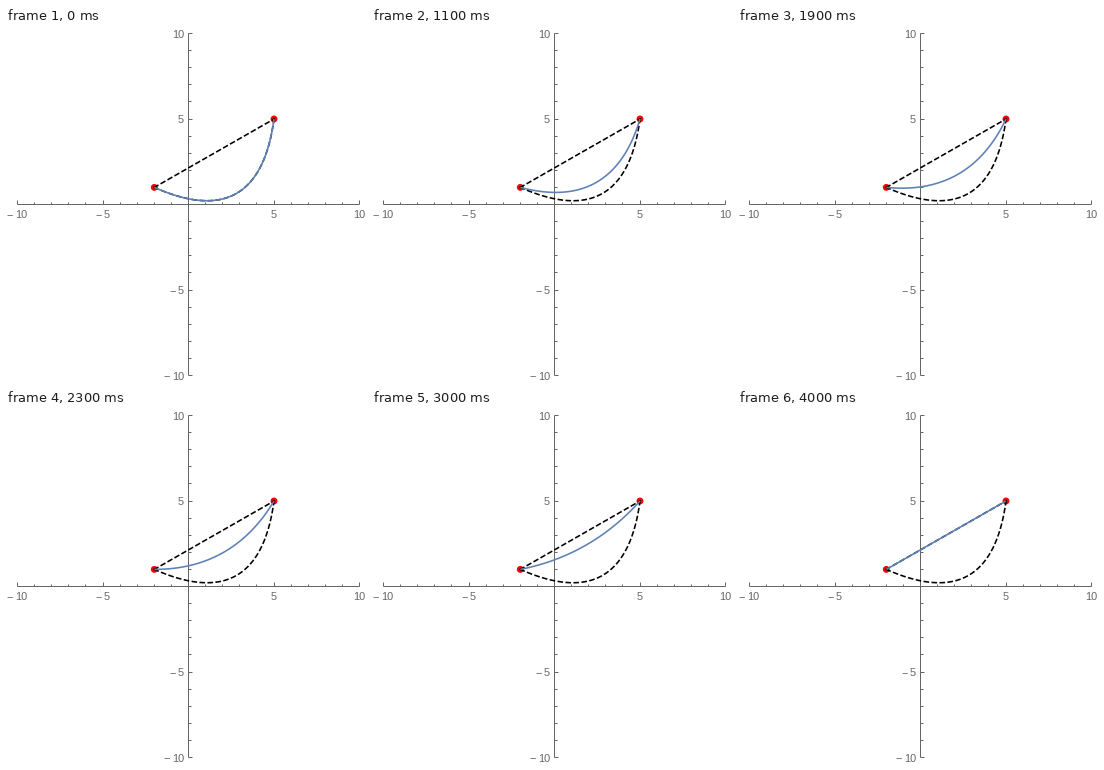
Animation, 360 px wide and 354 px high, one loop 4.1 s. Source, as a matplotlib script:

```python
import numpy as np
import matplotlib.pyplot as plt
from matplotlib.animation import FuncAnimation

W, H, DPI = 360, 354, 100
FRAMES, INTERVAL = 41, 100
CX, CY, UNIT = 182.5, 176.5, 17.1
GRAY, BLUE, RED = "#666666", "#5e81b5", "#ff0000"
PT = 72 / DPI  # points per pixel
FONT_PX, DIGIT_W, MINUS_GAP = 11, 6.12, 2.3
LINE_PX, DASH_PX, DOT_R = 1.6, 4, 3.45

START, END = np.array([-2.0, 1.0]), np.array([5.0, 5.0])
BEND = np.array([4.1, -1.71])

fig = plt.figure(figsize=(W / DPI, H / DPI), dpi=DPI, facecolor="white")
ax = fig.add_axes([0, 0, 1, 1])
ax.set_xlim(0, W)
ax.set_ylim(H, 0)
ax.axis("off")


def to_px(points):
    return CX + UNIT * points[..., 0], CY - UNIT * points[..., 1]


def rule(xs, ys):
    """Crisp one-pixel line; snapping rounds up, hence the half-pixel shift."""
    ax.plot(np.array(xs) - 0.5, np.array(ys) - 0.5, color=GRAY, lw=PT,
            snap=True, solid_capstyle="butt", zorder=1)


def label(value, right, base):
    """Right-aligned number with a spaced minus sign."""
    style = dict(family="Liberation Sans", size=FONT_PX * PT, color=GRAY,
                 ha="right", va="baseline")
    digits = str(abs(value))
    ax.text(right, base, digits, **style)
    if value < 0:
        ax.text(right - DIGIT_W * len(digits) - MINUS_GAP, base, "\u2212", **style)


def label_width(value):
    return DIGIT_W * len(str(abs(value))) + (6.4 + MINUS_GAP if value < 0 else 0)


def draw_axes():
    rule([CX - 10 * UNIT, CX + 10 * UNIT], [CY, CY])
    rule([CX, CX], [CY - 10 * UNIT, CY + 10 * UNIT])
    for v in range(-10, 11):
        if v == 0:
            continue
        major = v % 5 == 0
        size = 4 if major else 2.5
        x, y = CX + v * UNIT, CY - v * UNIT
        rule([x, x], [CY, CY - size])
        rule([CX, CX + size], [y, y])
        if major:
            label(v, x + label_width(v) / 2 - 0.5, 190)
            label(v, 178, y + 4)


t = np.linspace(0, 1, 121)[:, None]
line = (1 - t) * START + t * END
curve = (1 - t) ** 2 * START + 2 * t * (1 - t) * BEND + t ** 2 * END

draw_axes()
for point in (START, END):
    ax.add_patch(plt.Circle(to_px(point), DOT_R, color=RED, lw=0, zorder=2))
for path in (line, curve):
    ax.plot(*to_px(path), color="black", lw=LINE_PX * PT,
            dashes=(DASH_PX / LINE_PX, DASH_PX / LINE_PX),
            dash_capstyle="projecting", zorder=3)
moving, = ax.plot([], [], color=BLUE, lw=LINE_PX * PT, solid_capstyle="butt", zorder=4)


def update(frame):
    s = frame / (FRAMES - 1)
    moving.set_data(*to_px((1 - s) * curve + s * line))
    return moving,


anim = FuncAnimation(fig, update, frames=FRAMES, interval=INTERVAL, repeat=True)
plt.show()
```
